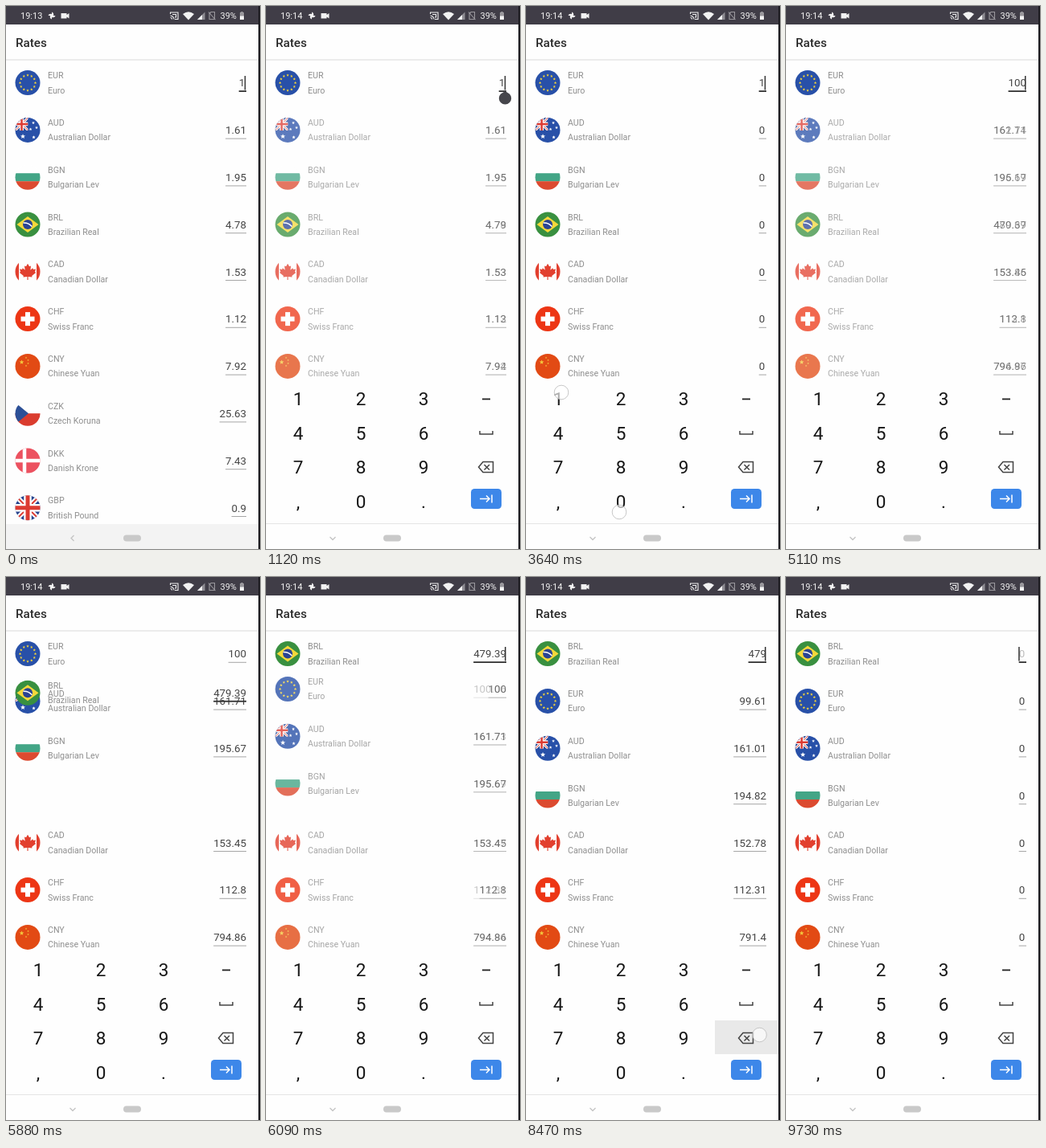
Animation, 316 px wide and 676 px high, one loop 9800 ms. Source, as an HTML page:

```html
<!DOCTYPE html>
<html lang="en">
<head>
<meta charset="utf-8">
<title>Rates</title>
<style>
html, body { margin: 0; width: 100%; height: 100%; overflow: hidden; background: #fefefe; }
svg { display: block; }
#stage { width: 316px; height: 676px; font-family: Roboto, sans-serif; }
.label { font-size: 10.65px; fill: #8e8e8e; }
.value { font-size: 13.3px; }
.key { font-size: 22.5px; fill: #161616; text-anchor: middle; }
.status { font-size: 11px; fill: #f2f2f2; }
</style>
</head>
<body>
<svg id="stage" viewBox="0 0 316 676">
  <defs><clipPath id="disc"><circle r="15.5"/></clipPath></defs>
  <rect width="316" height="676" fill="#fefefe"/>
  <g id="rows"></g>
  <g id="keyboard"></g>

  <rect id="nav" y="645" width="316" height="31"/>
  <rect id="navLine" y="644" width="316" height="1" fill="#e4e4e4"/>
  <path id="chevron" fill="none" stroke="#c4c4c4" stroke-width="1.3"/>
  <rect x="146" y="658.5" width="22" height="8" rx="4" fill="#c9c9c9"/>

  <rect width="316" height="23" fill="#403d47"/>
  <text id="clock" class="status" x="18" y="16"></text>
  <g fill="#f2f2f2">
    <path d="M57 12V7.5q3 1 2 4.500ZM57 12h4.500q-1 3-4.500 2ZM57 12v4.500q-3-1-2-4.500ZM57 12h-4.500q1-3 4.500-2Z"/>
    <path d="M68.500 9h7v2l3-2v6.500l-3-2v2h-7Z"/>
    <path d="M220 10q7-5.500 14 0l-7 7.500Z"/>
    <path d="M238 17h9.500V7.500Z" opacity=".45"/>
    <path d="M238 17h6v-6Z"/>
    <path d="M291 8h1.200V7h2.600v1h1.200v9h-5Z" opacity=".5"/>
    <path d="M291 12.500h5V17h-5Z"/>
  </g>
  <g fill="none" stroke="#f2f2f2" stroke-width="1.100">
    <path d="M204.500 10V8h9.500v8.500h-4M204.500 12q4 .5 4.500 4.500M204.500 14.500q2 0 2 2M207 10.500h4.500v3.500h-1.500"/>
    <path d="M253 9.500 255 7.500h4.500V16.500h-6.500ZM252 7.500l8.500 9.500" opacity=".5"/>
  </g>
  <text class="status" x="266.500" y="16">39%</text>
  <text x="12" y="51" font-size="15.2" font-weight="500" fill="#2a2a2a">Rates</text>
  <rect y="66.500" width="314" height="1" fill="#dcdcdc"/>

  <path id="handle" d="M297.500 106l5.500 3.500a7.700 7.700 0 1 1-11 0Z" fill="#46464b"/>
  <rect id="cursor" y="87" width="1.500" height="17.500" fill="#333"/>
  <g id="touches"></g>
  <rect x="314" width="2" height="676" fill="#1c1b20"/>
</svg>
<script>
const LOOP = 9800, PITCH = 58.8, FIRST_Y = 95.6, RIGHT = 299;
const FOCUS_AT = 5700, SHIFT_AT = 5925, FADE = 250;
const $ = id => document.getElementById(id);
const clamp = v => Math.max(0, Math.min(1, v));
const progress = (t, start, length) => clamp((t - start) / length);
const ease = p => (1 - Math.cos(Math.PI * p)) / 2;
const set = (el, attrs) => { for (const k in attrs) el.setAttribute(k, attrs[k]); };

// Flags, drawn around the origin inside a disc
const rect = (x, y, w, h, fill) => `<rect x="${x}" y="${y}" width="${w}" height="${h}" fill="${fill}"/>`;
const fillAll = color => rect(-16, -16, 32, 32, color);
const cross = (x, width, color) =>
  `<path d="M${x}-16V16M-16 0H16" stroke="${color}" stroke-width="${width}"/>`;
const saltire = (width, color) =>
  `<path d="M-16-16 16 16M16-16-16 16" stroke="${color}" stroke-width="${width}"/>`;
function star(cx, cy, r, fill) {
  const points = Array.from({ length: 10 }, (_, i) => {
    const a = i * Math.PI / 5, d = i % 2 ? r * .45 : r;
    return `${(cx + d * Math.sin(a)).toFixed(2)},${(cy - d * Math.cos(a)).toFixed(2)}`;
  });
  return `<polygon points="${points.join(' ')}" fill="${fill}"/>`;
}
const unionJack = fillAll('#27458f') + saltire(6, '#fff') + saltire(2, '#dc3b32')
  + cross(0, 9.5, '#fff') + cross(0, 5, '#dc3b32');
const leafSide = [[0, -9], [1.8, -5.8], [3.6, -6.6], [3, -1.8], [5.6, -4], [6.2, -2.6], [9, -3],
  [8, 0], [9, 1], [4.6, 4.6], [5, 6], [.5, 5.5], [.5, 9]];
const leaf = [...leafSide, ...leafSide.map(([x, y]) => [-x, y]).reverse()].join(' ');
const euStars = Array.from({ length: 12 }, (_, i) =>
  star(9.5 * Math.sin(i * Math.PI / 6), 9.5 * Math.cos(i * Math.PI / 6), 1.8, '#f3d43b')).join('');

const flags = {
  EUR: fillAll('#2850a8') + euStars,
  AUD: fillAll('#2850a8')
    + `<svg x="-15.5" y="-15.5" width="16" height="16" viewBox="-16 -16 32 32">${unionJack}</svg>`
    + [[-6, 8, 3.2], [7, -9, 2], [3.5, -1, 2], [11, -3, 2], [7.5, 9, 2.2]]
      .map(s => star(...s, '#fff')).join(''),
  BGN: fillAll('#fefefe') + rect(-16, -5, 32, 10, '#43a586') + rect(-16, 5, 32, 11, '#dc4a30'),
  BRL: fillAll('#399040') + '<path d="M-13.500 0 0-10 13.500 0 0 10Z" fill="#f4d83a"/>'
    + '<circle r="6" fill="#2b4391"/><path d="M-5.500-2Q1-2.500 5.300 2.500" fill="none" stroke="#fff" stroke-width="1.500"/>',
  CAD: fillAll('#fefefe') + rect(-16, -16, 5, 32, '#e2402f') + rect(11, -16, 5, 32, '#e2402f')
    + `<polygon points="${leaf}" transform="scale(1.12)" fill="#e2402f"/>`,
  CHF: fillAll('#ed3615') + rect(-8.5, -3, 17, 6, '#fff') + rect(-3, -8.5, 6, 17, '#fff'),
  CNY: fillAll('#e24a14') + star(-7.5, -5, 3, '#f3c53b')
    + [[-2, -10.5], [.5, -7.5], [.5, -3.5], [-2, -.5]].map(p => star(...p, 1.3, '#f3c53b')).join(''),
  CZK: fillAll('#fefefe') + rect(-16, 0, 32, 16, '#da3c2e') + '<path d="M-16-14 1 0-16 14Z" fill="#2c5097"/>',
  DKK: fillAll('#ec5260') + cross(-4, 4.5, '#fff'),
  GBP: unionJack
};

// Code, name, rate per 100 units, slot before and after the reorder
const rows = [
  ['EUR', 'Euro', 100.045, 0, 1],
  ['AUD', 'Australian Dollar', 161.71, 1, 2],
  ['BGN', 'Bulgarian Lev', 195.67, 2, 3],
  ['CAD', 'Canadian Dollar', 153.45, 4, 4],
  ['CHF', 'Swiss Franc', 112.8, 5, 5],
  ['CNY', 'Chinese Yuan', 794.86, 6, 6],
  ['CZK', 'Czech Koruna', 2571.5, 7, 7],
  ['DKK', 'Danish Krone', 745.5, 8, 8],
  ['GBP', 'British Pound', 90.2, 9, 9],
  ['BRL', 'Brazilian Real', 479.39, 3, 0]
].map(([code, name, rate, from, to]) => {
  const el = document.createElementNS('http://www.w3.org/2000/svg', 'g');
  const value = '<g><text class="value" y="4.800"></text><rect/></g>';
  el.innerHTML = `<g><g transform="translate(27 0)" clip-path="url(#disc)">${flags[code]}</g>
    <text class="label" x="52" y="-5.500">${code}</text>
    <text class="label" x="52" y="13">${name}</text></g>${value}${value}`;
  $('rows').append(el);
  const [body, older, newer] = el.children;
  return { code, rate, from, to, el, body, older, newer };
});

// Polled rates: time and factor
const polls = [[0, .009967], [985, .009985], [1985, .010014], [2985, 0], [3985, 1.00266],
  [4985, 1], [6000, 1.0001], [6985, 1.0003], [7985, .99565], [8985, 0]];
const typing = [[0, '1'], [1000, '1'], [2700, ''], [3300, '1'], [3680, '10'], [3900, '100'],
  [FOCUS_AT, '479.39'], [7700, '479.3'], [7830, '479.'], [7980, '479'],
  [8510, '47'], [8610, '4'], [8700, '']];
const DELETE = [290.5, 570], ZERO = [116, 630];
const touches = [[580, 720, 294, 100], [2560, 2710, ...DELETE], [3270, 3670, 44, 481],
  [3600, 3740, ...ZERO], [3830, 3950, ...ZERO], [5560, 5710, 285, 272],
  [7640, 7740, ...DELETE], [7780, 7870, ...DELETE], [7920, 8010, ...DELETE], [8430, 8720, ...DELETE]];
const latest = (list, t) => list.findLastIndex(([start]) => start <= t);

// Keyboard
const keyX = [40, 118, 196, 274], keyY = [489, 531.5, 574, 616.5];
const keyText = ['123', '456', '789', ',0.'].flatMap((line, r) => [...line].map((c, i) =>
  `<text class="key" x="${keyX[i]}" y="${keyY[r] + 8}">${c}</text>`)).join('');
$('keyboard').innerHTML = rect(0, 466, 316, 180, '#fefefe')
  + '<rect id="pressed" x="235" y="552" width="79" height="42" fill="#e9e9e9"/>' + keyText
  + rect(269, 488.5, 10, 1.8, '#222') + rect(255, 601, 38, 25, '#3d87e9" rx="4.5')
  + `<g fill="none" stroke="#444" stroke-width="1.500">
    <path d="M266 529v4h16v-4"/>
    <path d="M270 567.500h12.500v13H270l-5.500-6.500ZM271.500 571l6.500 6.500M278 571l-6.500 6.500"/>
    <path d="M266 613.500h12M274 609.500l4 4-4 4M281 608.500v10" stroke="#fff"/></g>`;

function showValue(group, text, opacity, focused) {
  const [label, line] = group.children;
  label.textContent = text || '0';
  const textWidth = label.getComputedTextLength();
  const width = Math.max(9.3, textWidth), left = RIGHT - width;
  set(group, { opacity });
  set(label, { x: left, fill: text ? '#444' : '#bdbdbd' });
  set(line, { x: left, y: focused ? 9.6 : 10.2, width, height: focused ? 1.8 : 1,
    fill: focused ? '#333' : '#a6a6a6' });
  return text ? Math.min(left + textWidth, RIGHT - 1.5) : left;
}

function render(t) {
  const poll = latest(polls, t);
  const fade = poll ? ease(progress(t, polls[poll][0], FADE)) : 1;
  const [typedAt, typed] = typing[latest(typing, t)];
  const focus = t < FOCUS_AT ? 'EUR' : 'BRL';
  const shift = ease(progress(t, SHIFT_AT, FADE));
  const jump = ease(progress(t, SHIFT_AT - 125, 125));

  for (const row of rows) {
    const focused = row.code === focus;
    const amount = i => row.code === 'EUR' && polls[i][0] < 6000
      ? '100' : String(+(row.rate * polls[i][1]).toFixed(2));
    const p = focused ? 1 : fade;
    const slot = row.from + (row.to - row.from) * (row.code === 'BRL' ? jump : shift);
    set(row.el, { transform: `translate(0 ${FIRST_Y + slot * PITCH})` });
    set(row.body, { opacity: 1 - p * (1 - p) });
    showValue(row.older, amount(Math.max(0, poll - 1)), 1 - p, false);
    const caret = showValue(row.newer, focused ? typed : amount(poll), p, focused);
    if (focused) {
      const on = Math.floor((t - typedAt) / 500) % 2 === 0 && (t < FOCUS_AT || t >= SHIFT_AT);
      set($('cursor'), { x: caret - .5, opacity: +on });
    }
  }

  const open = 1 - (1 - progress(t, 700, 250)) ** 2;
  set($('keyboard'), { transform: `translate(0 ${180 * (1 - open)})` });
  set($('nav'), { fill: open ? '#fefefe' : '#f3f3f3' });
  set($('navLine'), { opacity: open });
  set($('chevron'), { d: open ? 'M79.500 661l3.500 3.500 3.500-3.500' : 'M84.500 659l-3.500 3.500 3.500 3.500' });
  $('clock').textContent = t < 1000 ? '19:13' : '19:14';
  set($('handle'), { opacity: +(t >= 1000 && t < 2700) });

  const active = touches.filter(([start, end]) => t >= start && t < end);
  set($('pressed'), { opacity: +active.some(touch => touch[2] === DELETE[0]) });
  $('touches').innerHTML = active.map(([, , x, y]) =>
    `<circle cx="${x}" cy="${y}" r="8.800" fill="#fff" fill-opacity=".65" stroke="#bbb" stroke-opacity=".8"/>`).join('');
}

const began = performance.now();
function frame() {
  render((performance.now() - began) % LOOP);
  requestAnimationFrame(frame);
}
frame();
</script>
</body>
</html>
```
